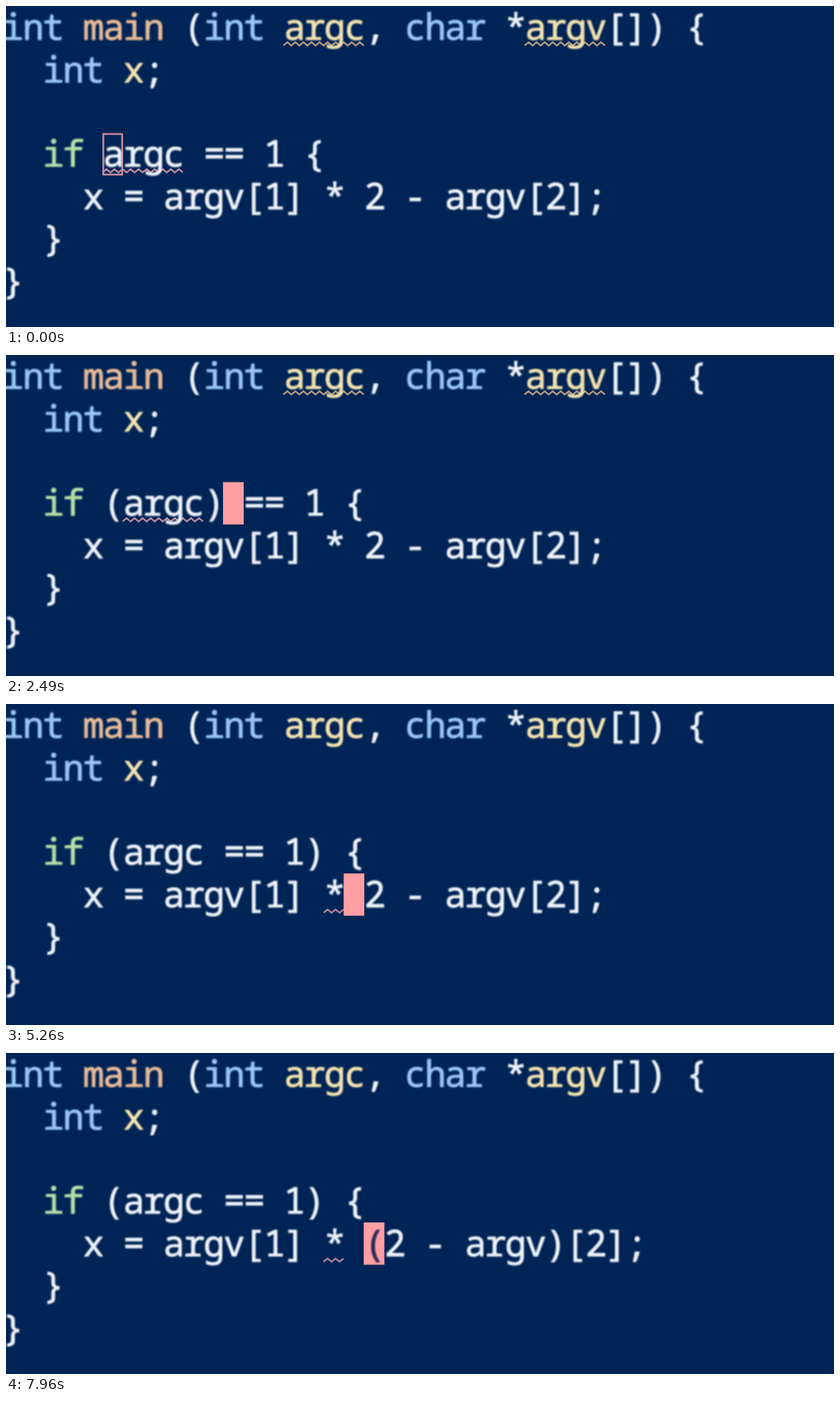
These frames come from a looping animation (1202x466 px, 7990 ms). An HTML page:

```html
<!DOCTYPE html>
<html lang="en">
<head>
<meta charset="utf-8">
<title>Wrapping code in parentheses</title>
<style>
  html, body { margin: 0; width: 100%; height: 100%; overflow: hidden; background: #002456; }
  #stage { position: relative; width: 1202px; height: 466px; overflow: hidden; background: #002456; }
  #marks { position: absolute; inset: 0; filter: blur(.7px); }
  #marks path { fill: none; stroke-width: 2.4; }
  .row {
    position: absolute; left: -5.2px; white-space: pre;
    font: 52px/61.4px "Noto Sans Mono", "DejaVu Sans Mono", monospace;
    letter-spacing: calc(29.18px - 1ch);
    font-variant-ligatures: none;
    color: #eef2f8;
    -webkit-text-stroke: 1px currentColor;
    filter: blur(1px);
  }
  .type { color: #98c6f6; }
  .name { color: #e8bb98; }
  .var  { color: #f3e3ae; }
  .key  { color: #b4dfa6; }
  .under { color: #2b2a58; }
</style>
</head>
<body>
<div id="stage"><svg id="marks" width="1202" height="466"></svg></div>
<script>
const LOOP = 7990, CELL = 29.18, LEFT = -5.9, ROW = 61.4;
const PINK = '#ff9fa4';

const colX = col => LEFT + col * CELL;
const rowY = row => row * ROW;

const lines = [
  'int main (int argc, char *argv[]) {',
  '  int x;',
  '',
  '  if argc == 1 {',
  '    x = argv[1] * 2 - argv[2];',
  '  }',
  '}'
];
const ifWord = '  if (argc) == 1 {';
const ifAll = '  if (argc == 1) {';
const wrapped = '    x = argv[1] * (2 - argv)[2];';

// Wavy underlines: row, column, length, colour
const params = [[0, 14, 4, '#b39a80'], [0, 26, 4, '#b39a80']];
const early = [...params, [3, 5, 4, '#b98a9e']];
const shifted = [...params, [3, 6, 4, '#b98a9e']];
const star = [[4, 16, 1, '#ad8299']];

// Each step changes only what it names
const steps = [
  { at: 0, cursor: [3, 5], hollow: true, waves: early, edit: {} },
  { at: 1130, hollow: false },
  { at: 2130, cursor: [3, 11], waves: shifted, edit: { 3: ifWord } },
  { at: 2560, cursor: [3, 16], edit: { 3: ifAll } },
  { at: 3030, waves: star },
  { at: 4130, cursor: [4, 16] },
  { at: 4660, cursor: [4, 17] },
  { at: 5630, cursor: [4, 18] },
  { at: 5830, cursor: [4, 19] },
  { at: 6030, cursor: [4, 20] },
  { at: 6230, cursor: [4, 21] },
  { at: 7190, cursor: [4, 18], edit: { 3: ifAll, 4: wrapped } }
];
for (let i = 1; i < steps.length; i++) steps[i] = { ...steps[i - 1], ...steps[i] };

const stage = document.getElementById('stage');
const marks = document.getElementById('marks');
const rows = lines.map((_, r) => {
  const el = document.createElement('div');
  el.className = 'row';
  el.style.top = rowY(r) - 1.8 + 'px';
  return stage.appendChild(el);
});

function tokenClass(word, row) {
  if (word === 'int' || word === 'char') return 'type';
  if (word === 'main') return 'name';
  if (word === 'if') return 'key';
  return row < 2 && /^\w/.test(word) ? 'var' : '';
}

const span = (cls, text) => cls ? `<span class="${cls}">${text}</span>` : text;

function lineHtml(text, row, dark) {
  let col = 0;
  return text.split(/(\w+)/).map(word => {
    const cls = tokenClass(word, row);
    const at = dark - col;
    col += word.length;
    if (at < 0 || at >= word.length) return span(cls, word);
    return span(cls, word.slice(0, at)) + span('under', word[at]) + span(cls, word.slice(at + 1));
  }).join('');
}

function wave([row, col, len, color]) {
  const x0 = colX(col), y = rowY(row) + 55, half = 5.84;
  let d = `M${x0} ${y + 2.4}`;
  for (let i = 1; i * half <= len * CELL + .1; i++) {
    d += `L${x0 + i * half} ${y + (i % 2 ? -2.4 : 2.4)}`;
  }
  return `<path d="${d}" stroke="${color}"/>`;
}

function cursorBox([row, col], hollow) {
  const inset = hollow ? 1.3 : 0;
  const paint = hollow ? 'fill="none" stroke="#c98a9b" stroke-width="2.6"' : `fill="${PINK}"`;
  return `<rect x="${colX(col) + inset}" y="${rowY(row) + .4 + inset}" ` +
    `width="${CELL + .8 - 2 * inset}" height="${ROW - 2 * inset}" ${paint}/>`;
}

function draw({ cursor, hollow, waves, edit }) {
  marks.innerHTML = waves.map(wave).join('') + cursorBox(cursor, hollow);
  rows.forEach((el, r) => {
    const dark = r === cursor[0] && !hollow ? cursor[1] : -1;
    el.innerHTML = lineHtml(edit[r] || lines[r], r, dark);
  });
}

let shown = null;
function tick() {
  const t = performance.now() % LOOP;
  const step = steps.filter(s => s.at <= t).pop();
  if (step !== shown) draw(shown = step);
  requestAnimationFrame(tick);
}
tick();
</script>
</body>
</html>
```
